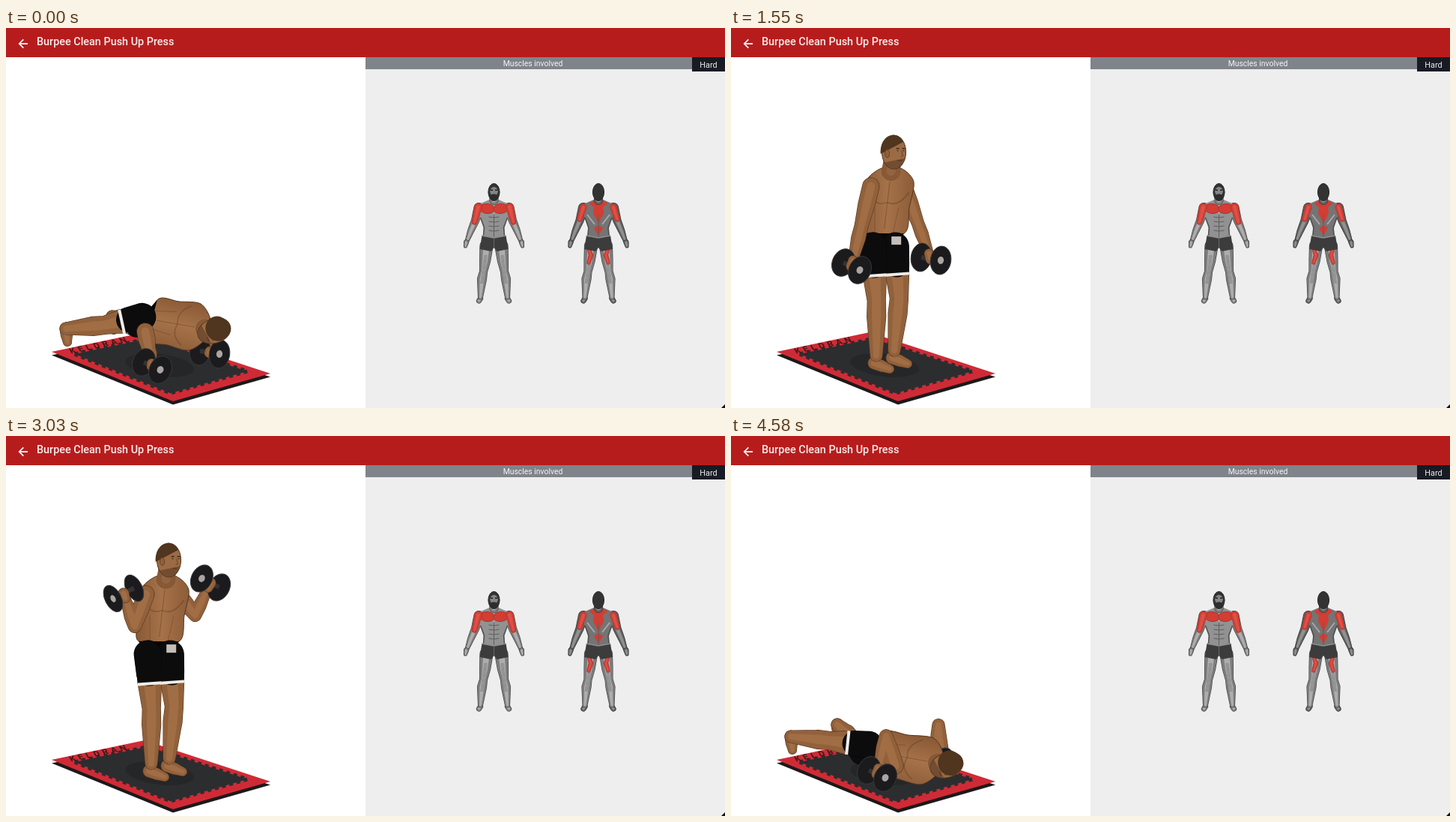
An HTML page with a canvas for the animation above (4650 ms loop, 960 by 507 pixels).

```html
<!DOCTYPE html>
<html lang="en">
<head>
<meta charset="utf-8">
<title>Burpee Clean Push Up Press</title>
<style>
  html, body { margin: 0; width: 100%; height: 100%; overflow: hidden; background: #fff; }
  canvas { display: block; }
</style>
</head>
<body>
<canvas id="stage" width="960" height="507"></canvas>
<script>
const ctx = document.getElementById('stage').getContext('2d');
const LOOP = 4650, STEPS = 60;
const ARM = 108, LEG = 152, DISC = 19;
const SKIN = ['#53351f', '#91613b', '#a06d45'];
const CLOTH = ['#050505', '#0c0c0d', '#0c0c0d'];
const GREY = ['#3e3e3e', '#7c7c7c', '#adadad'];
const DARK_GREY = ['#2c2c2c', '#606060', '#909090'];
const RED = ['#a5352e', '#d33d33', '#dc5148'];
const { PI, cos, sin, hypot, atan2, min, max, sqrt } = Math;

// Points are [x, y] arrays.
const add = (p, q, k = 1) => [p[0] + q[0] * k, p[1] + q[1] * k];
const mid = (p, q, t = .5) => p.map((v, i) => v + (q[i] - v) * t);
const toward = (p, q) => {
  const d = add(q, p, -1), length = hypot(...d) || 1;
  return [d[0] / length, d[1] / length];
};
const distance = (p, q) => hypot(...add(q, p, -1));

// back: feet behind (1) or under the body (0); bend: elbows down (1) or up (-1).
const pose = (waist, chest, handN, handF, { back = 0, bend = 0, twist = 0 } = {}) =>
  ({ waist, chest, handN, handF, back: [back], bend: [bend], twist: [twist] });
const standing = (handN, handF, style) => pose([204, 274], [212, 205], handN, handF, style);
const onFloor = (waist, chest, style) => pose(waist, chest, [195, 451], [272, 433], style);

const rack = standing([157, 210], [270, 196], { bend: 1 });
const rackTurned = standing([157, 210], [273, 196], { bend: 1, twist: .55 });
const overhead = standing([165, 90], [260, 90], { bend: 1 });
const hang = standing([161, 318], [267, 308]);
const hinge = pose([201, 308], [242, 273], [179, 397], [275, 375]);
const lowHinge = pose([214, 301], [250, 270], [201, 390], [269, 381]);
const crouch = onFloor([208, 335], [256, 326]);
const pike = onFloor([198, 334], [254, 370], { back: .4 });
const plank = onFloor([190, 372], [250, 366], { back: 1 });
const halfway = onFloor([195, 389], [252, 399], { back: 1 });
const bottom = onFloor([196, 422], [262, 434], { back: 1, bend: -1 });

const keys = [
  [0, halfway], [3, plank], [7, pike], [9, crouch], [16, hinge], [20, hang],
  [24, rack], [29, rack], [32, overhead], [34, overhead], [37, rackTurned],
  [40, rackTurned], [43, hang], [47, lowHinge], [50, crouch], [52, pike],
  [55, plank], [57, halfway], [59, bottom], [60, halfway]
];

function poseAt(step) {
  const next = keys.findIndex(key => key[0] > step);
  const [from, a] = keys[next - 1], [to, b] = keys[next];
  const blend = {};
  for (const part in a) blend[part] = mid(a[part], b[part], (step - from) / (to - from));
  return blend;
}

function paint(fill, stroke, width = 1) {
  if (fill) { ctx.fillStyle = fill; ctx.fill(); }
  if (stroke) { ctx.strokeStyle = stroke; ctx.lineWidth = width; ctx.stroke(); }
}

function rect(x, y, w, h, fill) {
  ctx.fillStyle = fill;
  ctx.fillRect(x, y, w, h);
}

function oval(x, y, rx, ry, fill, { stroke, turn = 0, from = 0, to = 2 * PI } = {}) {
  ctx.beginPath();
  ctx.ellipse(x, y, rx, ry, turn, from, to);
  paint(fill, stroke);
}

function line(points, color, width = 1) {
  ctx.beginPath();
  points.forEach(p => ctx.lineTo(...p));
  paint(null, color, width);
}

function poly(points, fill) {
  ctx.beginPath();
  points.forEach(p => ctx.lineTo(...p));
  ctx.closePath();
  paint(fill);
}

// Closed curve through all points.
function blob(p, fill, stroke) {
  const n = p.length, at = i => p[(i + n) % n];
  ctx.beginPath();
  ctx.moveTo(...p[0]);
  for (let i = 0; i < n; i++) {
    const b = at(i), c = at(i + 1);
    ctx.bezierCurveTo(...add(b, add(c, at(i - 1), -1), 1 / 7),
      ...add(c, add(at(i + 2), b, -1), -1 / 7), ...c);
  }
  paint(fill, stroke);
}

// Tapered limb through [x, y, radius] joints.
function chain(joints, [edge, base, light]) {
  const pass = (scale, grow, color) => {
    ctx.beginPath();
    for (let i = 1; i < joints.length; i++) {
      const [ax, ay, ar] = joints[i - 1], [bx, by, br] = joints[i];
      const turn = atan2(by - ay, bx - ax), q = PI / 2;
      const ra = ar * scale + grow, rb = br * scale + grow;
      ctx.moveTo(ax + ra * cos(turn + q), ay + ra * sin(turn + q));
      ctx.arc(ax, ay, ra, turn + q, turn + 3 * q);
      ctx.arc(bx, by, rb, turn - q, turn + q);
      ctx.closePath();
    }
    paint(color);
  };
  pass(1, .6, edge);
  pass(1, 0, base);
  pass(.5, 0, light);
}

function text(str, x, y, font, color, align = 'left') {
  ctx.font = font + ' Roboto, sans-serif';
  ctx.textAlign = align;
  ctx.fillStyle = color;
  ctx.fillText(str, x, y);
}

function drawMat() {
  const top = [[61, 432], [185, 406], [353, 461], [223, 498]];
  const center = mid(top[0], top[2]);
  poly(top.map(p => add(p, [0, 4.5])), '#1d191a');
  poly(top, '#cf2b36');
  const inner = top.map(p => mid(center, p, .79));
  poly(inner, '#2c2d2f');
  ctx.setLineDash([5, 5]);
  line([...inner, inner[0]], '#2c2d2f', 5);
  ctx.setLineDash([]);
  oval(205, 450, 46, 15, '#252628', { turn: .12 });
  ctx.save();
  ctx.transform(.976, -.205, .45, .78, 87, 434.5);
  ctx.letterSpacing = '4px';
  text('KELDRAN', 0, 0, 'bold 12px', '#42171b');
  ctx.restore();
}

// Joint positions follow from the spine, the hands and the feet.
function solve({ waist, chest, handN, handF, back: [back], bend: [bend], twist: [twist] }) {
  const up = toward(waist, chest);
  const lean = atan2(up[0], -up[1]);
  const tilt = min(1.85, .6 * lean ** 2);
  const across = [cos(tilt), sin(tilt)];
  const spread = min(66, 25 + 14 * lean ** 2) * (1 + .35 * min(0, bend));

  const arm = (shoulder, hand) => {
    const slack = max(0, ARM - distance(shoulder, hand));
    return [shoulder, add(mid(shoulder, hand), [0, .55 * slack * bend]), hand];
  };
  const hop = -16 * sin(PI * back);
  const ankles = [mid([194, 437], [80, 401], back), mid([218, 430], [142, 385], back)]
    .map(p => add(p, [0, hop]));
  const pelvis = add(waist, toward(waist, mid(...ankles)), 17);
  const leg = (ankle, side) => {
    const hip = add(pelvis, [across[0], across[1] * .3], 15 * side);
    const [dx, dy] = toward(hip, ankle);
    const slack = max(0, LEG - distance(hip, ankle));
    const knee = add(mid(hip, ankle), [dy, -dx], .45 * slack * max(0, dy));
    return { hip, knee, ankle, heel: add(ankle, [-3, 10], 1 - back), toe: add(ankle, mid([18, 18], [2, 18], back)) };
  };
  const lift = max(0, bend);
  const [fx, fy] = mid([13, 2], [-13, 1], lift);
  return {
    waist, chest, up, across,
    turn: .42 * lean ** 2,
    head: add(chest, up, 26 + 14 * max(0, -up[1]) ** 4),
    armN: arm(add(chest, [-spread, 6]), handN),
    armF: arm(add(chest, [20, 8]), handF),
    barN: mid([11, 5], [-14, 7], lift),
    barF: [fx * cos(twist) - fy * sin(twist), fx * sin(twist) + fy * cos(twist)],
    legN: leg(ankles[0], -1),
    legF: leg(ankles[1], 1)
  };
}

function drawArm([shoulder, elbow, hand], bar, r) {
  const turn = atan2(bar[1], bar[0]);
  const thin = DISC * sqrt(max(.15, 1 - (hypot(...bar) / DISC) ** 2));
  const disc = side => oval(...add(hand, bar, side), thin, DISC, '#1b1b1d', { stroke: '#39383a', turn });
  chain([[...shoulder, r], [...mid(shoulder, elbow, .45), r], [...elbow, r * .8],
    [...mid(elbow, hand, .3), r * .85], [...hand, r * .5]], SKIN);
  disc(-1);
  line([add(hand, bar, -1), add(hand, bar)], '#343234', 6);
  chain([[...mid(hand, elbow, .15), 6], [...hand, 7]], SKIN);
  disc(1);
  oval(...add(hand, bar), thin * .3, 5, '#aaa5a2', { turn });
}

function drawLeg({ hip, knee, ankle, heel, toe }) {
  chain([[...heel, 8], [...mid(heel, toe), 7.5], [...toe, 5.5]], SKIN);
  chain([[...hip, 16], [...mid(hip, knee, .55), 15.5], [...knee, 12],
    [...mid(knee, ankle, .3), 12.5], [...ankle, 8]], SKIN);
}

function drawTorso({ waist, chest, up, across }) {
  const neck = add(chest, up, 18), belly = mid(chest, waist);
  const widths = [[neck, 13], [chest, 32], [belly, 30], [waist, 27]];
  const side = s => widths.map(([p, w]) => add(p, across, s * w));
  const shade = ctx.createLinearGradient(...add(belly, across, -32), ...add(belly, across, 32));
  shade.addColorStop(0, '#8b5b37');
  shade.addColorStop(.5, '#a57249');
  shade.addColorStop(1, '#8f5f3a');
  blob([...side(-1), ...side(1).reverse()], shade, SKIN[0]);
  const tone = 'rgba(84,50,26,.35)';
  line([chest, add(waist, up, 6)], tone, 1.2);
  for (const s of [-1, 1]) {
    const rib = add(belly, across, s * 16);
    ctx.beginPath();
    ctx.moveTo(...mid(chest, belly, .8));
    ctx.quadraticCurveTo(...rib, ...add(mid(chest, belly, .4), across, s * 27));
    paint(null, tone, 1.5);
    line([rib, add(waist, across, s * 12)], tone);
  }
}

function drawShorts({ waist, across, up, legN, legF }) {
  const sides = [-27, 27].map(w => add(waist, across, w));
  poly([...sides, legF.hip, legN.hip], CLOTH[0]);
  for (const { hip, knee } of [legF, legN]) {
    const hem = mid(hip, knee, .54), along = toward(hip, knee);
    const edge = [-16, 16].map(w => add(hem, [-along[1], along[0]], w));
    chain([[...hip, 18], [...mid(hip, knee, .35), 16.5]], CLOTH);
    poly([...[18, -18].map(w => add(hip, [-along[1], along[0]], w)), ...edge], CLOTH[1]);
    line(edge, '#efece8', 4);
  }
  if (up[1] < -.97) {
    const [x, y] = mid(...sides, .8);
    rect(x - 6, y + 4, 13, 11, '#c3beba');
  }
}

function drawHead({ head, turn, chest, up }) {
  chain([[...add(chest, up, 14), 12], [...head, 10]], ['#7d5231', '#875937', '#936440']);
  ctx.save();
  ctx.translate(...head);
  ctx.rotate(turn);
  oval(1, 0, 16, 22.5, '#9b6b43', { stroke: SKIN[0] });
  oval(1, 0, 15.5, 22, 'rgba(66,43,28,.45)', { from: .12 * PI, to: .78 * PI });
  oval(0, -1, 17, 22, '#50351f', { from: .95 * PI, to: 1.8 * PI });
  oval(-8, 2, 3, 5, '#916039', { stroke: '#65422a' });
  for (const x of [4, 12]) {
    line([[x, -5], [x + 4, -5]], '#3e2819', 1.5);
    line([[x + 1, -2], [x + 3, -2]], '#33251d');
  }
  line([[11, -2], [13, 5], [10, 6]], '#69442a');
  line([[6, 11], [12, 11]], '#59301f');
  const crown = min(1, max(0, turn - .3));
  if (crown) oval(-1, -5, 17 * crown, 16 * crown, '#50351f');
  ctx.restore();
}

function drawAthlete(body) {
  drawArm(body.armF, body.barF, 10);
  drawLeg(body.legF);
  drawLeg(body.legN);
  drawTorso(body);
  drawShorts(body);
  drawHead(body);
  drawArm(body.armN, body.barN, 11);
}

function mirrored(draw) {
  for (const side of [-1, 1]) {
    ctx.save();
    ctx.scale(side, 1);
    draw();
    ctx.restore();
  }
}

function drawMuscles(cx, back) {
  const tone = back ? DARK_GREY : GREY;
  ctx.save();
  ctx.translate(cx, 207);
  mirrored(() => {
    chain([[18, 154, 3], [20, 157, 3]], tone);
    chain([[10, 84, 8.5], [12, 104, 7], [14, 118, 5], [16, 128, 6], [18, 152, 3]], GREY);
    chain([[20, 33, 6.5], [25, 50, 5], [31, 64, 4], [37, 80, 2]], tone);
    chain([[37, 79, 3], [38, 84, 2]], tone);
    poly([[0, 22], [6, 22], [20, 28], [19, 44], [14, 60], [15, 74], [0, 74]], back ? '#747474' : '#929292');
    line([[18, 46], [13, 59], [14, 70]], '#505050', 1.5);
    for (let i = 0; i < 5; i++) line([[9 + i, 96], [11 + i, 112], [14 + i, 134]], i % 2 ? '#777' : '#959595', .7);
    if (back) {
      line([[5, 55], [15, 42]], '#a8a8a8', 2);
      poly([[0, 20], [13, 27], [6, 32], [7, 40], [0, 54]], RED[1]);
      poly([[0, 56], [6, 60], [0, 70]], RED[1]);
      chain([[20, 32, 4], [25, 48, 3]], RED);
      chain([[14, 84, 1.5], [10, 96, 2.5], [13, 106, 2]], RED);
    } else {
      oval(9, 34, 10, 6.5, RED[1], { stroke: RED[0], turn: -.1 });
      chain([[21, 32, 5], [26, 52, 3]], RED);
      for (let y = 46; y < 68; y += 6) line([[0, y], [7, y - 1]], '#5e5e5e');
    }
  });
  line([[0, 42], [0, 72]], '#5e5e5e');
  mirrored(() => {
    poly([[0, 73], [16, 70], [19, 88], [4, 91], [0, 86]], '#3c3c3c');
    line([[0, 73], [16, 70]], '#8f8f8f', 1.5);
  });
  chain([[0, 14, 5], [0, 23, 5.5]], tone);
  oval(0, 12, 7.6, 11.5, '#333', { stroke: '#292929' });
  if (!back) {
    oval(0, 11, 5.3, 6, '#858585');
    oval(0, 19, 5.5, 4.5, '#2d2d2d');
    mirrored(() => line([[1.5, 9.5], [5, 9]], '#202020', 1.5));
  }
  ctx.restore();
}

function drawInterface() {
  rect(480, 39, 480, 468, '#eeeeee');
  rect(480, 39, 480, 16, '#7f848a');
  rect(916, 39, 44, 19, '#181a24');
  rect(0, 0, 960, 39, '#b71c1c');
  line([[29, 21], [18, 21]], '#fff', 1.7);
  line([[23.3, 15.4], [17.7, 21], [23.3, 26.6]], '#fff', 1.7);
  text('Burpee Clean Push Up Press', 41, 23, '500 14.4px', '#fbeeee');
  text('Muscles involved', 703.5, 51, '10.4px', '#f4f4f4', 'center');
  text('Hard', 938, 53, '10.9px', '#eee', 'center');
  drawMuscles(651.5, false);
  drawMuscles(791, true);
  poly([[960, 502], [960, 507], [955, 507]], '#111');
}

const start = performance.now();

function render() {
  const time = (performance.now() - start) % LOOP;
  const step = min(STEPS - 1, Math.floor((time + 8) * STEPS / LOOP));
  rect(0, 0, 960, 507, '#fff');
  drawMat();
  drawAthlete(solve(poseAt(step)));
  drawInterface();
  requestAnimationFrame(render);
}

render();
</script>
</body>
</html>
```
